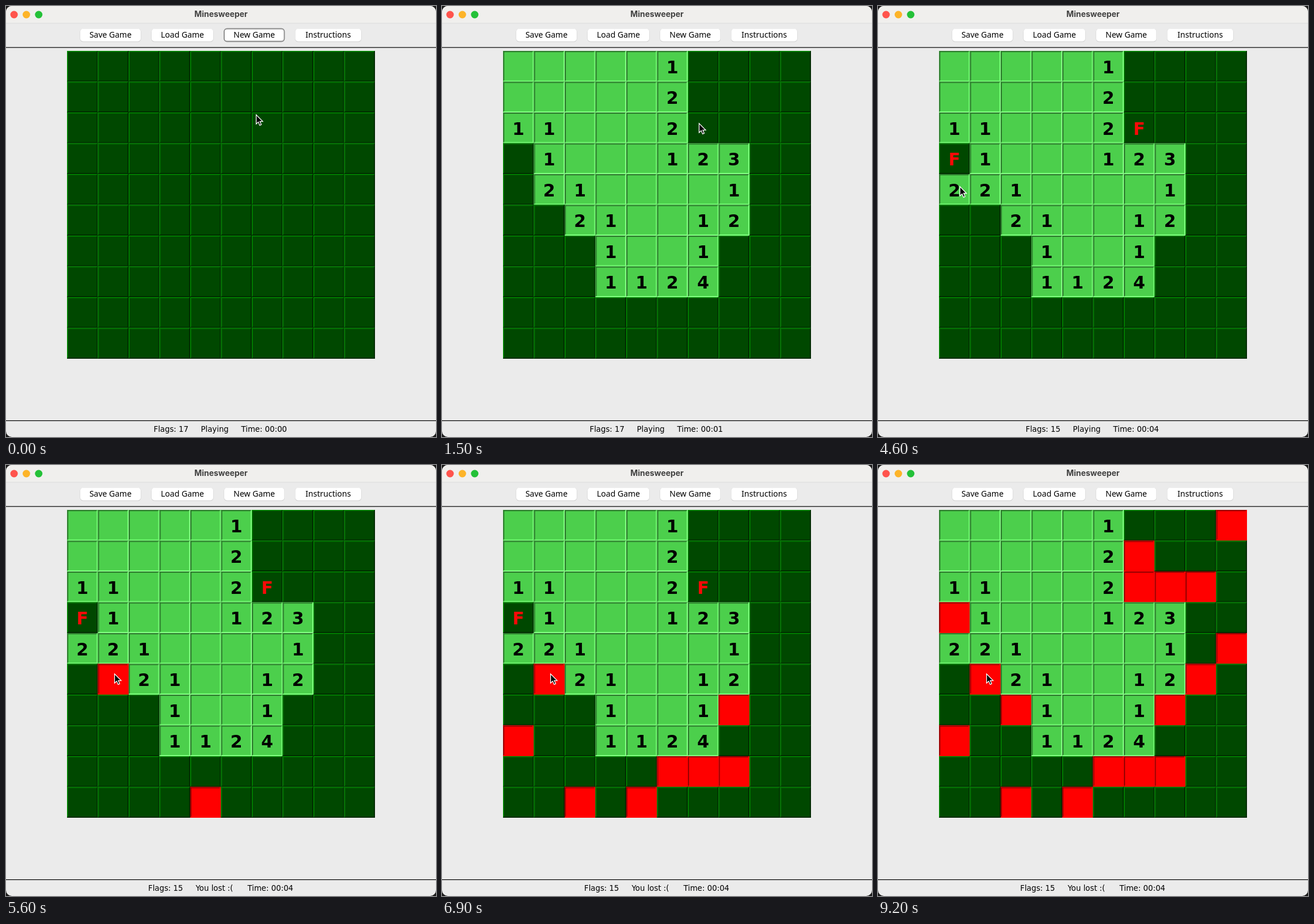
An HTML page with a canvas for the animation above (9300 ms loop, 747 by 749 pixels).

```html
<!DOCTYPE html>
<html lang="en">
<head>
<meta charset="utf-8">
<title>Minesweeper</title>
<style>
html, body { margin: 0; width: 100%; height: 100%; overflow: hidden; background: #1c1c1c; }
canvas { display: block; }
</style>
</head>
<body>
<canvas id="stage" width="747" height="749"></canvas>
<script>
const ctx = document.getElementById('stage').getContext('2d');
const LOOP = 9300, LEFT = 106, TOP = 78, CELL = 53.5, LINE = 1.07;
const OPEN_AT = 450, FLAG_A = 1700, FLAG_B = 3200, SAFE_AT = 4300, HIT_AT = 5400, MINES_AT = 5600, MINE_STEP = 200;
const board = [
  '000001....', '000002....', '110002....', '.1000123..', '.2100001..',
  '..210012..', '...1001...', '...1124...', '..........', '..........'
];
// Row and column of each mine, in the order they are uncovered after the loss
const mines = '94 92 87 86 85 70 67 62 58 49 30 28 27 26 16 09'.split(' ');
// time, x, y of the pointer tip
const path = [
  [0, 434, 188], [350, 437, 302], [600, 437, 302], [1200, 446, 203], [2000, 446, 203],
  [2900, 138, 274], [3500, 138, 274], [4100, 139, 310], [4500, 139, 310], [5200, 188, 362], [LOOP, 188, 362]
];
const buttons = [['Save Game', 129, 105], ['Load Game', 253, 107], ['New Game', 379, 104.5], ['Instructions', 502.5, 114.5]];

// Bevel shades: outer and inner top-left, then outer and inner bottom-right
const closed = { fill: '#004800', bevel: ['#009300', '#006700', '#002300', '#003200'] };
const opened = { fill: '#4ccf4c', bevel: ['#359135', '#256525', '#9bff9b', '#6dff6d'] };
const mined = { fill: '#ff0000', bevel: ['#b20000', '#7c0000', '#ff0000', '#ff0000'] };

function rect(x, y, w, h, color) {
  ctx.fillStyle = color;
  ctx.fillRect(x, y, w, h);
}

function round(x, y, w, h, r, color) {
  ctx.beginPath();
  ctx.roundRect(x, y, w, h, r);
  ctx.fillStyle = color;
  ctx.fill();
}

function text(str, x, y, font, color = '#000', align = 'center') {
  ctx.font = font;
  ctx.textAlign = align;
  ctx.fillStyle = color;
  ctx.fillText(str, x, y);
}

function drawWindow(focused) {
  rect(0, 0, 747, 749, '#1c1c1c');
  round(0, 0, 747, 749, 10, '#ebebeb');
  round(0, 0, 747, 30, [10, 10, 0, 0], '#f0efed');
  rect(0, 29.5, 747, 1, '#dcdcdc');
  ['#ff544d', '#fdb429', '#24c138'].forEach((color, i) => round(7.5 + i * 21.4, 8.5, 13, 13, 6.5, color));
  text('Minesweeper', 373.5, 19.3, '700 13.9px Inter, sans-serif', '#404040');
  rect(0, 71.5, 747, 1.2, '#000');
  rect(0, 720, 747, 1.2, '#000');
  for (const [label, x, w] of buttons) {
    round(x - 0.5, 39.5, w + 1, 23, 5.5, '#d2d2d2');
    round(x, 39.5, w, 22, 5, '#fff');
    if (focused && label === 'New Game') {
      ctx.strokeStyle = '#8a8a8a';
      ctx.lineWidth = 1.8;
      ctx.stroke();
    }
    text(label, x + w / 2, 54.5, '14px "Noto Sans", sans-serif');
  }
}

function drawCell(row, col, { fill, bevel }, label, color) {
  const x = LEFT + col * CELL, y = TOP + row * CELL;
  rect(x, y, CELL, CELL, fill);
  for (const i of [0, 1]) {
    const inset = i * LINE, size = CELL - 2 * inset, far = CELL - inset - LINE;
    rect(x + inset, y + inset, size, LINE, bevel[i]);
    rect(x + inset, y + inset, LINE, size, bevel[i]);
    rect(x + inset, y + far, size, LINE, bevel[i + 2]);
    rect(x + far, y + inset, LINE, size, bevel[i + 2]);
  }
  if (label) text(label, x + CELL / 2, y + 38.5, 'bold 30px "DejaVu Sans", sans-serif', color);
}

function drawBoard(t) {
  for (let row = 0; row < 10; row++) {
    for (let col = 0; col < 10; col++) {
      const key = `${row}${col}`, order = mines.indexOf(key);
      let value = t >= OPEN_AT ? board[row][col] : '.';
      if (key === '40' && t >= SAFE_AT) value = '2';
      const blown = key === '51' ? t >= HIT_AT : order >= 0 && t >= MINES_AT + order * MINE_STEP;
      const flagged = key === '26' && t >= FLAG_A || key === '30' && t >= FLAG_B;
      if (blown) drawCell(row, col, mined);
      else if (value !== '.') drawCell(row, col, opened, value === '0' ? '' : value, '#000');
      else drawCell(row, col, closed, flagged ? 'F' : '', '#f80a08');
    }
  }
}

function drawStatus(t) {
  const lost = t >= HIT_AT;
  const flags = 17 - (t >= FLAG_A) - (t >= FLAG_B);
  const seconds = Math.max(0, Math.floor((Math.min(t, HIT_AT) - OPEN_AT) / 1000));
  const xs = lost ? [247, 329.5, 419.5] : [256.5, 338.5, 408.5];
  [`Flags: ${flags}`, lost ? 'You lost :(' : 'Playing', `Time: 00:0${seconds}`].forEach((str, i) =>
    text(str, xs[i], 740, '13.3px "DejaVu Sans", sans-serif', '#000', 'left'));
}

function drawPointer(t) {
  const i = path.findIndex(p => p[0] > t);
  const [t0, x0, y0] = path[i - 1], [t1, x1, y1] = path[i];
  const u = (t - t0) / (t1 - t0), k = u * u * (3 - 2 * u);
  ctx.save();
  ctx.translate(x0 + (x1 - x0) * k + 0.6, y0 + (y1 - y0) * k + 1);
  const arrow = new Path2D('M0 0V16L3.7 12.6L6.2 18.4L8.9 17.2L6.5 11.6H11.4Z');
  ctx.fillStyle = '#000';
  ctx.fill(arrow);
  ctx.strokeStyle = '#fff';
  ctx.lineWidth = 1.3;
  ctx.stroke(arrow);
  ctx.restore();
}

function draw(now) {
  const t = Math.floor(now % LOOP / 100) * 100;
  drawWindow(t < OPEN_AT);
  drawBoard(t);
  drawStatus(t);
  drawPointer(t);
  requestAnimationFrame(draw);
}
requestAnimationFrame(draw);
</script>
</body>
</html>
```
